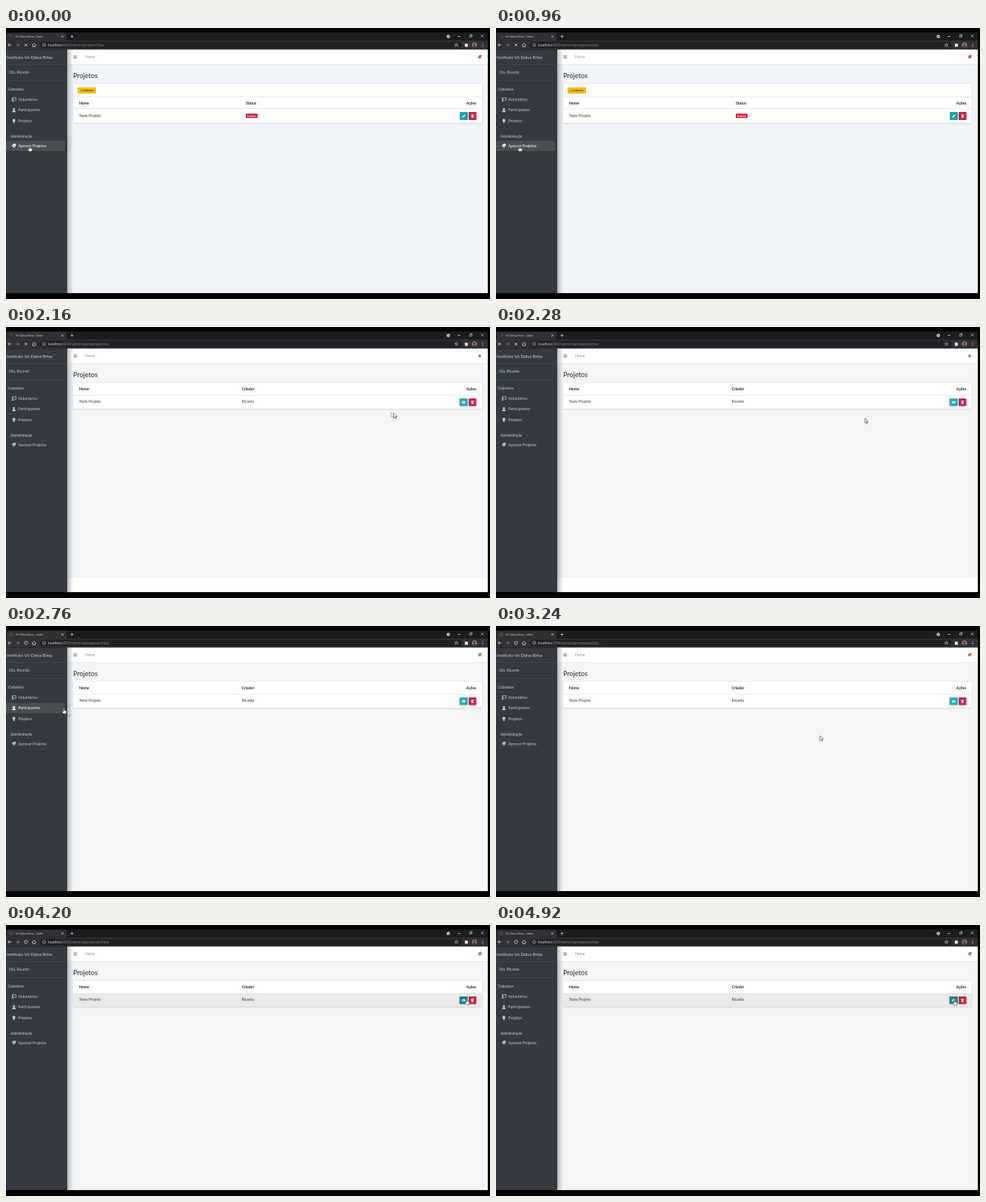
These frames come from a looping animation (656x368 px, 5400 ms). An HTML page with a canvas:

```html
<!DOCTYPE html>
<html lang="pt-BR">
<head>
<meta charset="utf-8">
<title>Projetos</title>
<style>
html, body { margin: 0; width: 100%; height: 100%; overflow: hidden; background: #000; }
canvas { display: block; width: 656px; height: 368px; }
</style>
</head>
<body>
<canvas id="stage"></canvas>
<script>
const W = 656, H = 368, LOOP = 5400, STEP = 120;
const PAGE_AT = 1200, SETTLE_AT = 1920, LOADED_AT = 2400;
const UI = 'Lato, sans-serif', CHROME = '"Open Sans", sans-serif';

const canvas = document.getElementById('stage');
const ratio = window.devicePixelRatio || 1;
canvas.width = W * ratio;
canvas.height = H * ratio;
const c = canvas.getContext('2d');

// Pointer path: time, x, y
const PATH = [
  [0, 32, 160], [1680, 32, 160], [1920, 330, 146], [2040, 522, 116],
  [2160, 525.5, 117], [2280, 500, 124], [2520, 230, 138], [2640, 83.5, 116],
  [2760, 78.5, 111.5], [2880, 150, 148], [3000, 270, 168], [3120, 318, 168],
  [3360, 560, 130], [3480, 622, 101], [3600, 624.5, 100.5],
  [4200, 624.5, 100.5], [4320, 621.5, 101.5], [LOOP, 621.5, 101.5]
];

const MENU = [
  { label: 'Voluntários', y: 97, icon: 'board' },
  { label: 'Participantes', y: 111.5, icon: 'user' },
  { label: 'Projetos', y: 126, icon: 'bulb' },
  { label: 'Aprovar Projetos', y: 160, icon: 'check' }
];

function rect(x, y, w, h, color, r = 0) {
  c.fillStyle = color;
  c.beginPath();
  c.roundRect(x, y, w, h, r);
  c.fill();
}

function disc(x, y, r, color) {
  c.fillStyle = color;
  c.beginPath();
  c.arc(x, y, r, 0, Math.PI * 2);
  c.fill();
}

function ring(x, y, r, color, width = 0.7, from = 0, to = Math.PI * 2) {
  c.strokeStyle = color;
  c.lineWidth = width;
  c.beginPath();
  c.arc(x, y, r, from, to);
  c.stroke();
}

function text(str, x, y, size, color, { font = UI, weight = 400, align = 'left' } = {}) {
  c.font = `${weight} ${size}px ${font}`;
  c.fillStyle = color;
  c.textAlign = align;
  c.fillText(str, x, y);
  return c.measureText(str).width;
}

function shape(d, x, y, { fill, stroke, width = 0.8 }) {
  const p = new Path2D(d);
  c.save();
  c.translate(x, y);
  if (fill) { c.fillStyle = fill; c.fill(p); }
  if (stroke) { c.strokeStyle = stroke; c.lineWidth = width; c.stroke(p); }
  c.restore();
}

function pointerAt(t) {
  const i = Math.max(1, PATH.findIndex(p => p[0] >= t));
  const [t0, x0, y0] = PATH[i - 1], [t1, x1, y1] = PATH[i];
  const k = Math.max(0, (t - t0) / (t1 - t0));
  return { x: x0 + (x1 - x0) * k, y: y0 + (y1 - y0) * k };
}

const overMenu = p => p.x < 80 && MENU.find(m => Math.abs(p.y - m.y) < 7);
const overButton = p => p.x > 614 && p.x < 638 && p.y > 97 && p.y < 107;

function drawChrome(t) {
  const light = '#dcdde0', dim = '#85888c';
  const loading = t < LOADED_AT;
  rect(0, 6, 653, 12, '#1c1d1f');
  rect(1, 6.5, 81, 12, '#303134', 2);
  rect(0, 17, 653, 12.5, '#303134');
  rect(46, 18.7, 572, 8.8, '#202124', 4.4);

  if (loading) {
    const a = t / STEP * 1.1 + 3.4;
    ring(6.6, 11.5, 2, '#8b8e92', 0.7, a, a + 1.7);
  } else {
    ring(7, 11.5, 1.9, '#686b70', 0.8);
  }
  text('Vó Dalva Brisa | Adm', 13, 12.9, 3.8, '#d5d6d9', { font: CHROME });
  shape('M-1.3-1.3L1.3 1.3M1.3-1.3L-1.3 1.3', 76.5, 11.5, { stroke: light });
  shape('M-2 0H2M0-2V2', 89.5, 11.5, { stroke: light, width: 0.7 });

  disc(599.5, 11.5, 2.3, '#d0d1d3');
  shape('M-1-.4H1L0 .9Z', 599.5, 11.5, { fill: '#222' });
  shape('M-2 0H2', 614, 11.5, { stroke: light, width: 0.7 });
  shape('M-1.6-1H1V1.6H-1.6ZM-.7-1.8H1.8V.7', 630, 10.8, { stroke: light, width: 0.6 });
  shape('M-1.7-1.7L1.7 1.7M1.7-1.7L-1.7 1.7', 645.5, 10.8, { stroke: light, width: 0.7 });

  shape('M2.4 0H-2M0-2.2L-2.2 0L0 2.2', 5, 23, { stroke: light });
  shape('M-2.4 0H2M0-2.2L2.2 0L0 2.2', 16, 23, { stroke: dim });
  if (loading) {
    shape('M-1.8-1.8L1.8 1.8M1.8-1.8L-1.8 1.8', 27, 23, { stroke: light });
  } else {
    ring(27, 23, 2.1, light, 0.8, 0.3, 5.4);
    shape('M2.5-2.6V-.4H.3Z', 27, 23, { fill: light });
  }
  shape('M-2.5.2L0-2.3L2.5.2M-1.8-.2V2.3H1.8V-.2', 38, 23, { stroke: light });
  ring(51.7, 23, 2.2, '#c5c7ca', 0.6);
  shape('M0-1.2V-.6M0-.1V1.3', 51.7, 23, { stroke: '#c5c7ca', width: 0.6 });

  const section = t < 960 ? 'projetos' : 'aprovacoes';
  const w = text('localhost', 57, 24.7, 4.55, '#e8eaed', { font: CHROME });
  text(`:8000/admin/${section}/lista`, 57 + w, 24.7, 4.55, '#8e9196', { font: CHROME });

  shape('M0-2.5L.7-.8L2.5-.7L1.1.4L1.6 2.2L0 1.2L-1.6 2.2L-1.1.4L-2.5-.7L-.7-.8Z', 610.5, 23, { stroke: light, width: 0.55 });
  shape('M-2.2-1.4H-.8A.8.8 0 0 1 .8-1.4H1.8V0A.8.8 0 0 1 1.8 1.5V2.4H-2.2V1.2A.8.8 0 0 0-2.2-.2Z', 624, 23, { fill: '#e8eaed' });
  disc(635, 23, 3.5, '#95756d');
  disc(635, 22.2, 1.3, '#4b3634');
  shape('M-2.4 2.5Q0-.8 2.4 2.5Q0 4.4-2.4 2.5Z', 635, 23, { fill: '#4b3634' });
  for (const dy of [-1.9, 0, 1.9]) disc(646, 23 + dy, 0.55, light);
}

const ICONS = {
  board(x, y, color) {
    shape('M-2.2.2V-2.3H2.9V1.2H.7', x, y, { stroke: color, width: 0.8 });
    disc(x - 1.6, y, 1, color);
    shape('M-3.3 2.8Q-3.2 1.2-1.6 1.2T.2 2.8Z', x, y, { fill: color });
  },
  user(x, y, color) {
    disc(x, y - 1.3, 1.5, color);
    shape('M-2.5 2.7Q-2.5.5-1 .5H1Q2.5.5 2.5 2.7Z', x, y, { fill: color });
  },
  bulb(x, y, color) {
    disc(x, y - 0.8, 2, color);
    rect(x - 1, y + 0.6, 2, 2.3, color, 0.5);
  },
  check(x, y, color) {
    shape('M-2.8-.4L-.3-2.8H2.6V0L0 2.8Z', x, y, { fill: color });
    shape('M-1.3 0L-.2 1L1.5-1', x, y, { stroke: '#40464c', width: 0.7 });
  }
};

function drawSidebar(t, pointer) {
  rect(0, 29.5, 83, 330.5, '#343a40');
  text('Instituto Vó Dalva Brisa', 1, 41.7, 6, '#cfd2d4');
  rect(0, 49, 83, 0.6, '#4b545c');
  text('Olá, Ricardo', 4, 62.2, 5.2, '#c2c7d0');
  rect(2, 71, 78, 0.6, '#4b545c');
  text('Cadastros', 3, 85.2, 4.8, '#d0d4db');
  text('Administração', 6, 148.7, 4.7, '#d0d4db');

  const fresh = t >= PAGE_AT && t < SETTLE_AT;
  const over = overMenu(pointer);
  for (const item of MENU) {
    const active = item === over;
    if (active && !fresh) rect(0, item.y - 7, 80, 14, '#494e53', 1.3);
    const color = active ? '#fff' : '#c2c7d0';
    ICONS[item.icon](10.7, item.y, color);
    text(item.label, 16.6, item.y + 1.9, 5.2, color);
  }
}

function drawBell(t) {
  const color = t < PAGE_AT ? '#a9545c'
    : t < LOADED_AT ? '#85888b'
    : t >= 3360 && t < 4200 ? '#bd5a4c' : '#b5714b';
  shape('M0-2.5Q1.8-2.1 1.8.2L2.4 1.5H-2.4L-1.8.2Q-1.8-2.1 0-2.5ZM-.8 1.9H.8Q0 3-.8 1.9Z', 642, 39.3, { fill: color });
  if (t < PAGE_AT || t >= LOADED_AT) disc(643.3, 38, 1.4, t < PAGE_AT ? '#c94355' : '#cf7142');
}

function button(x, y, w, h, color, icon) {
  rect(x, y, w, h, color, 1);
  const cx = x + w / 2, cy = y + h / 2;
  if (icon === 'trash') {
    shape('M-1.9-2H1.9V-1.3H-1.9ZM-1.5-.9H1.5L1.3 2.3H-1.3Z', cx, cy, { fill: '#fff' });
  } else if (icon === 'pen') {
    shape('M-2.2 2.2L-1.8.6L.8-2L2-.8L-.6 1.8Z', cx, cy, { fill: '#fff' });
  } else {
    shape('M-2.7 0Q0-3.6 2.7 0Q0 3.6-2.7 0Z', cx, cy, { fill: '#fff' });
    disc(cx, cy, 0.85, color);
  }
}

function card(bottom) {
  c.save();
  c.shadowColor = 'rgba(0,0,0,.2)';
  c.shadowBlur = 2 * ratio;
  c.shadowOffsetY = 0.5 * ratio;
  rect(91, 76, 554, bottom - 76, '#fff', 1);
  c.restore();
}

function tableHead(y, column, x) {
  const bold = { weight: 700 };
  text('Nome', 99, y, 5.1, '#212529', bold);
  text(column, x, y, 5.1, '#212529', bold);
  text('Ações', 637.5, y, 5.1, '#212529', { weight: 700, align: 'right' });
}

function drawProjects() {
  card(129);
  rect(97, 80.5, 25, 8.5, '#f8bd16', 1);
  text('+ Cadastrar', 109.5, 86, 3.6, '#2b2718', { align: 'center', weight: 700 });
  rect(91, 93.3, 554, 0.6, '#dfe2e5');
  tableHead(103.6, 'Status', 325);
  rect(91, 109.3, 554, 0.7, '#dee2e6');
  text('Teste Projeto', 99, 120.8, 5.1, '#343a40');
  rect(325, 116.3, 16, 6, '#c3263f', 1);
  text('Inativo', 333, 120.6, 3.7, '#fff', { weight: 700, align: 'center' });
  button(615, 114, 11, 11, '#21a1a8', 'pen');
  button(627, 114, 10.7, 11, '#c3263f', 'trash');
}

function drawApprovals(pointer) {
  card(111);
  if (pointer.y > 93 && pointer.y < 111 && pointer.x > 91) rect(91, 93, 554, 18, '#e9e9e9');
  rect(91, 92.6, 554, 0.7, '#dee2e6');
  tableHead(86.1, 'Criador', 319.5);
  text('Teste Projeto', 99, 103.4, 5.1, '#343a40');
  text('Ricardo', 319.5, 103.4, 5.1, '#343a40');
  button(614.5, 97, 11.5, 10.5, overButton(pointer) ? '#1c858c' : '#2badb0', 'eye');
  button(627, 97, 10.5, 10.5, '#c9244a', 'trash');
}

function drawPage(t, pointer) {
  rect(83, 29.5, 570, 330.5, t < SETTLE_AT ? '#f1f4f8' : '#f4f5f7');
  rect(83, 29.5, 570, 19.5, '#fff');
  rect(83, 49, 570, 0.5, '#dee2e6');
  if (t >= PAGE_AT && t < LOADED_AT) {
    const x = t < SETTLE_AT ? 90 : 83;
    rect(x, 341, 653 - x, 19, '#fff');
  }
  for (const dy of [-1.6, 0, 1.6]) rect(91.3, 39 + dy, 5, 0.8, '#777');
  text('Home', 107, 41.2, 5, '#8b8d8f');
  drawBell(t);
  text('Projetos', 91, 68.4, 9.2, '#212529');
  if (t < PAGE_AT) drawProjects();
  else drawApprovals(pointer);

  const shade = c.createLinearGradient(83, 0, 91, 0);
  shade.addColorStop(0, 'rgba(0,0,0,.25)');
  shade.addColorStop(1, 'rgba(0,0,0,0)');
  rect(83, 29.5, 8, 330.5, shade);
}

function drawPointer(p, alpha) {
  const hand = overMenu(p) || overButton(p);
  const d = hand
    ? 'M-.6.6Q0-.4.6.6V3L2.9 3.5Q3.8 3.8 3.5 5L2.9 7.6H-.9L-2.7 4.8Q-2.4 3.8-1.3 4.4L-.6 5Z'
    : 'M0 0V6.4L1.5 5L2.5 7.3L3.5 6.9L2.5 4.6H4.6Z';
  c.globalAlpha = alpha;
  shape(d, p.x, p.y, { fill: '#fff', stroke: '#333', width: 0.6 });
  c.globalAlpha = 1;
}

function draw(t) {
  const pointer = pointerAt(t);
  const last = pointerAt(Math.max(0, t - STEP));
  c.setTransform(ratio, 0, 0, ratio, 0, 0);
  rect(0, 0, W, H, '#000');
  drawChrome(t);
  drawPage(t, pointer);
  drawSidebar(t, pointer);
  // Short smear while the pointer moves slowly
  const gap = Math.hypot(pointer.x - last.x, pointer.y - last.y);
  if (gap > 3.3 && gap < 12) drawPointer(last, 0.5);
  drawPointer(pointer, 1);
}

const start = performance.now();
function tick() {
  const t = (performance.now() - start) % LOOP;
  draw(Math.floor(t / STEP) * STEP);
  requestAnimationFrame(tick);
}
tick();
</script>
</body>
</html>
```
